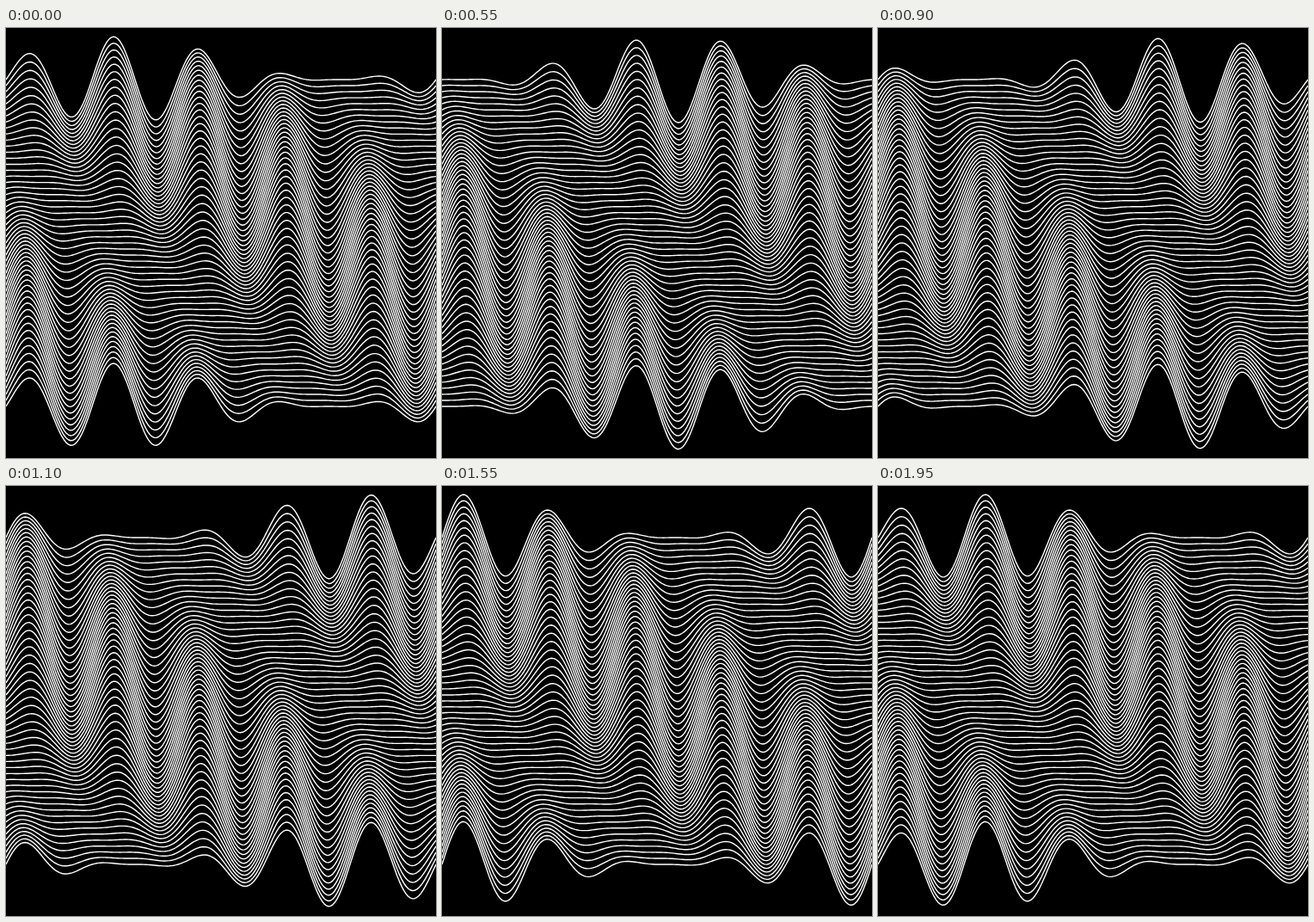
An HTML page for the animation above (2000 ms loop, 500 by 500 pixels).

```html
<!DOCTYPE html>
<html lang="en">
<head>
<meta charset="utf-8">
<title>Travelling waves</title>
<style>
  html, body { margin: 0; width: 100%; height: 100%; overflow: hidden; background: #000; }
  svg { display: block; width: 100%; height: 100%; }
  path { fill: none; stroke: #fff; stroke-width: 1.4; stroke-linejoin: round; }
</style>
</head>
<body>
<svg viewBox="0 0 500 500"><path id="waves"/></svg>
<script>
  const SIZE = 500, LOOP = 2000, TICK = 50;
  const LINES = 55, TOP = 60, BOTTOM = 440;
  const AMPLITUDE = 50, RIPPLES = 5, STEP = 2.5;
  const TAU = Math.PI * 2;
  const waves = document.getElementById('waves');

  // Fixed ripples, scaled by a swell that travels right and lags line by line.
  function offset(u, line, progress) {
    const swell = (1 + Math.sin(TAU * (u - progress - (line + 1) / LINES))) / 2;
    return -AMPLITUDE * swell * Math.sin(TAU * RIPPLES * u);
  }

  function linePath(line, progress) {
    const base = TOP + (BOTTOM - TOP) * line / (LINES - 1);
    const points = [];
    for (let x = 0; x <= SIZE; x += STEP) {
      points.push(x + ' ' + (base + offset(x / SIZE, line, progress)).toFixed(2));
    }
    return 'M' + points.join('L');
  }

  function render(time) {
    const progress = Math.floor((time % LOOP + 0.5) / TICK) * TICK / LOOP;
    let d = '';
    for (let line = 0; line < LINES; line++) d += linePath(line, progress);
    waves.setAttribute('d', d);
  }

  const start = performance.now();
  function frame() {
    render(performance.now() - start);
    requestAnimationFrame(frame);
  }
  render(0);
  requestAnimationFrame(frame);
</script>
</body>
</html>
```
